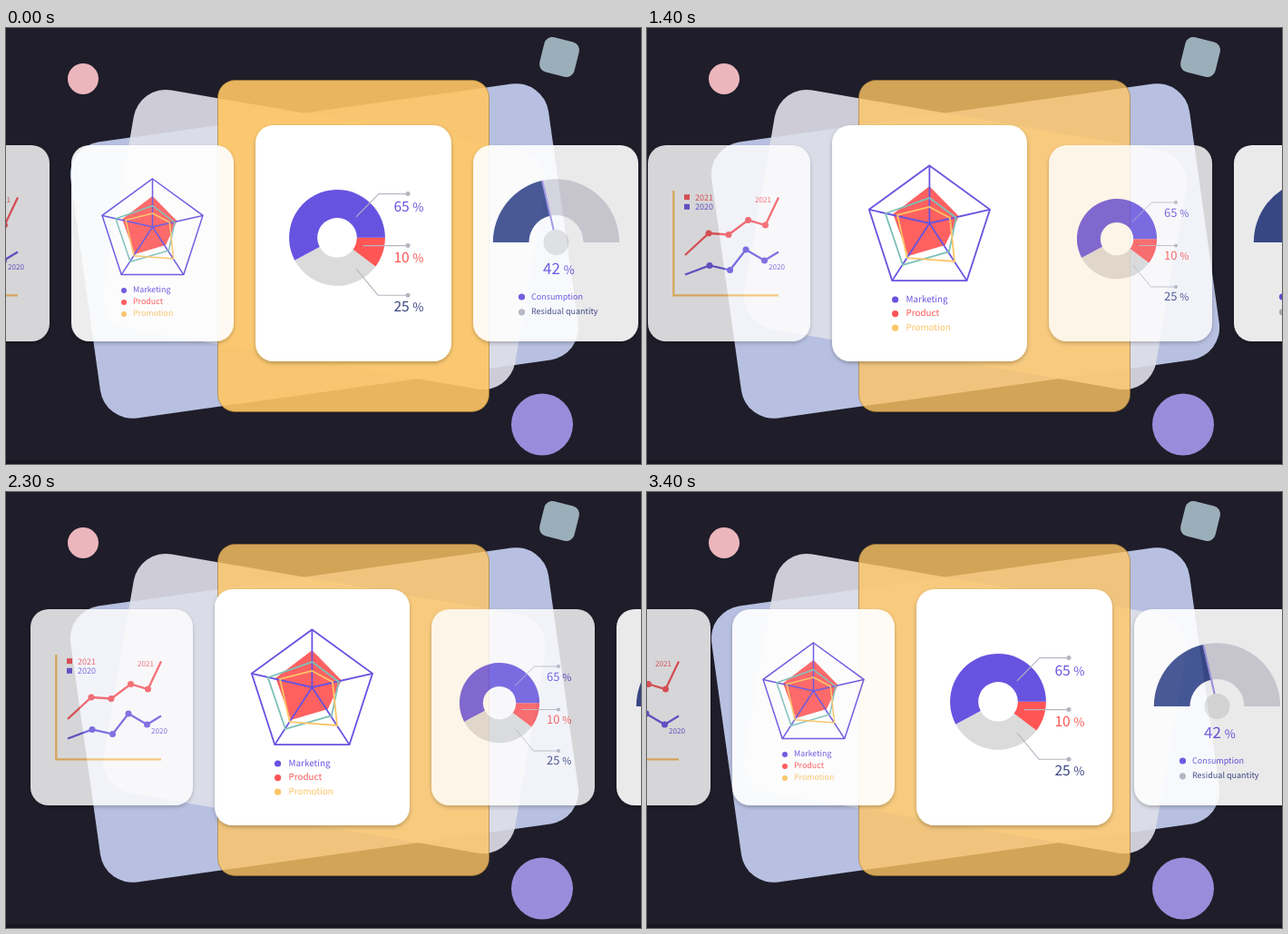
Animation of 700 by 480 pixels, one loop 3.5 s. Source, as an HTML page:

```html
<!DOCTYPE html>
<html lang="en">
<head>
<meta charset="utf-8">
<title>Chart carousel</title>
<style>
html, body { margin: 0; width: 100%; height: 100%; overflow: hidden; background: #1e1d29; }
svg { display: block; width: 100%; height: 100%; }
text { font-family: "Noto Sans CJK KR", "Noto Sans CJK JP", "Noto Sans CJK SC", "Noto Sans", sans-serif; font-weight: 500; white-space: pre; text-rendering: geometricPrecision; }
</style>
</head>
<body>
<svg viewBox="0 0 700 480" xmlns="http://www.w3.org/2000/svg">
  <defs>
    <filter id="shadow" x="-10%" y="-10%" width="120%" height="125%">
      <feDropShadow dx="0" dy="2" stdDeviation="2" flood-color="#000" flood-opacity=".26"/>
    </filter>
    <rect id="sheet" x="-266" y="-153.5" width="532" height="307" rx="36" transform="translate(351 245.5) rotate(-8)"/>
    <clipPath id="sheetClip"><use href="#sheet"/></clipPath>
    <rect id="pane" x="-230.2" y="-133.4" width="460.4" height="266.8" rx="36" transform="translate(351 233) rotate(9.8)"/>
  </defs>
  <rect width="700" height="480" fill="#1e1d29"/>
  <rect y="476" width="700" height="4" fill="#171620"/>
  <circle cx="85" cy="56" r="17" fill="#ebb6bc"/>
  <rect x="-19.7" y="-19.7" width="39.4" height="39.4" rx="9" fill="#9bafba" transform="translate(610 32) rotate(14)"/>
  <use href="#pane" fill="#cdccd7"/>
  <use href="#sheet" fill="#b7c0e0"/>
  <g clip-path="url(#sheetClip)"><use href="#pane" fill="#dadde8"/></g>
  <circle cx="591" cy="436.5" r="34" fill="#998ddb"/>
  <rect id="panel" x="233.5" y="57.5" width="299" height="365" rx="19" fill="#ffc664" stroke="#9a7430" stroke-opacity=".6"/>
  <g id="deck"></g>
</svg>
<script>
const PURPLE = '#6753e0', RED = '#ff5555', YELLOW = '#fcc566', TEAL = '#7dc0b8', NAVY = '#3c4582', GREY = '#b6b6c2';
const ZOOM = 1.2;

const text = (x, y, size, fill, s) => `<text x="${x}" y="${y}" font-size="${size}" fill="${fill}">${s}</text>`;
const dot = (x, y, r, fill) => `<circle cx="${x}" cy="${y}" r="${r}" fill="${fill}"/>`;
const line = (pts, color, w) => `<polyline points="${pts}" fill="none" stroke="${color}" stroke-width="${w}"/>`;
const loop = (pts, color, w) => `<polygon points="${pts}" fill="none" stroke="${color}" stroke-width="${w}"/>`;
const percent = (x, y, big, small, fill, n) =>
  text(x, y, big, fill, `${n} <tspan font-size="${small}">%</tspan>`);

// Ring segment, angles in degrees clockwise from the right
function sector(cx, cy, R, r, from, to, fill) {
  const at = (rad, deg) => {
    const a = deg * Math.PI / 180;
    return `${(cx + rad * Math.cos(a)).toFixed(2)} ${(cy + rad * Math.sin(a)).toFixed(2)}`;
  };
  const big = to - from > 180 ? 1 : 0;
  return `<path fill="${fill}" d="M${at(R, from)}A${R} ${R} 0 ${big} 1 ${at(R, to)}L${at(r, to)}A${r} ${r} 0 ${big} 0 ${at(r, from)}Z"/>`;
}

function trendChart() {
  const red = '#fb5a5e', violet = '#6f5be1';
  const series = (pts, color) => line(pts.join(' '), color, 2.3) +
    pts.slice(1, 5).map(([x, y]) => dot(x, y, 3.5, color)).join('');
  const key = (y, color, year) =>
    `<rect x="40" y="${y}" width="6" height="6" fill="${color}"/>` + text(52, y + 6.4, 9, color, year);
  return line('28.3,50 28.3,165.4 144,165.4', YELLOW, 2.3) +
    key(54.2, red, 2021) + key(64.8, violet, 2020) +
    series([[41, 121], [67, 97], [89, 98.5], [110.5, 82.5], [129.5, 88], [144, 57.5]], red) +
    series([[41, 142.5], [68, 132.5], [90.5, 137.5], [108, 115], [128.5, 127], [144, 117.5]], violet) +
    text(118, 63.2, 8.1, red, 2021) + text(133, 137.3, 8.1, violet, 2020);
}

function radarChart(active) {
  const cx = 89.5, hub = 90, size = active ? 8.2 : 8.9;
  const corners = [0, 1, 2, 3, 4].map(i => {
    const a = i * Math.PI * 0.4;
    return [(cx + 58.4 * Math.sin(a)).toFixed(1), (95.4 - 58.4 * Math.cos(a)).toFixed(1)];
  });
  const key = (y, color, name) => dot(58, y, 3, color) + text(68, y + 2.4, size, color, name);
  return `<polygon points="89.5,56 116.5,83.5 104,110 70,120 56,81.5" fill="${RED}" fill-opacity=".93"/>` +
    loop(corners.join(' '), PURPLE, 1.5) +
    corners.map(p => line(`${cx},${hub} ${p}`, PURPLE, 1.5)).join('') +
    loop('89.5,66.7 114,85 107.5,116 65,128.3 49,81', TEAL, 1.5) +
    loop('89.5,75 108.3,85 112.5,125 69,121.7 60,82.5', YELLOW, 1.5) +
    key(160, PURPLE, 'Marketing') + key(173, RED, 'Product') + key(186, YELLOW, 'Promotion');
}

function donutChart() {
  const ring = (a, b, fill) => sector(75, 103.2, 44.1, 18.2, a, b, fill);
  const lead = (pts, y) => line(pts, GREY, .9) + dot(140, y, 2.1, GREY);
  return ring(36, 152, '#dbdbdb') + ring(0, 36.6, RED) + ring(152, 360, PURPLE) +
    lead('92.5,84 113.3,63 140,63', 63) +
    lead('99,110.5 140,110.5', 110.5) +
    lead('92.5,131.7 112.5,156 140,156', 156) +
    percent(127, 79, 13, 11, PURPLE, 65) +
    percent(127, 125.8, 13, 11, RED, 10) +
    percent(127, 171, 13, 11, NAVY, 25);
}

function gaugeChart() {
  const cx = 91.5, cy = 107;
  return sector(cx, cy, 69.7, 30, 257, 360, '#d7d6df') +
    sector(cx, cy, 69.7, 30, 180, 257, '#3a4c8e') +
    line('76.2,39 88.8,94', '#a298e8', 2) +
    dot(cx, cy, 14, '#e4e4e4') +
    percent(77, 142, 17, 13, PURPLE, 42) +
    dot(53.5, 167, 3.6, PURPLE) + text(64, 170, 9, PURPLE, 'Consumption') +
    dot(53.5, 183.8, 3.6, GREY) + text(64, 186.3, 9, NAVY, 'Residual quantity');
}

function card(x, w, alpha, chart, active) {
  const k = active ? ZOOM : 1, y = active ? 107 : 129, h = active ? 260 : 216;
  return `<g transform="translate(${x} ${y})" opacity="${active ? 1 : alpha}">` +
    `<rect width="${w}" height="${h}" rx="20" fill="#fff" filter="url(#shadow)"/>` +
    `<g transform="scale(${k})">${chart(active)}</g></g>`;
}

const row = radarOn => '<g>' +
  card(0, 179, .82, trendChart, false) +
  card(203, radarOn ? 215 : 179, .92, radarChart, radarOn) +
  card(radarOn ? 442 : 406, radarOn ? 180 : 216, .82, donutChart, !radarOn) +
  card(646, 182, .91, gaugeChart, false) + '</g>';

const deck = document.getElementById('deck');
const panel = document.getElementById('panel');
deck.innerHTML = row(false) + row(true);
const [donutRow, radarRow] = deck.children;

const LOOP = 3500, STEP = 100;
// [ms, x of the row]
const track = [[0, -131], [400, -131], [800, -23], [900, -13.3], [1300, -13.3], [1900, 72.7],
  [2100, 72.7], [2500, -18.5], [2600, -22], [3000, -22], [3500, -131]];

function rowX(t) {
  const i = track.findIndex(k => k[0] > t);
  const [t0, x0] = track[i - 1], [t1, x1] = track[i];
  return x0 + (x1 - x0) * (t - t0) / (t1 - t0);
}

function draw(ms) {
  const t = Math.floor(ms % LOOP / STEP) * STEP;
  const radarOn = t >= 900 && t < 2600;
  donutRow.setAttribute('display', radarOn ? 'none' : 'inline');
  radarRow.setAttribute('display', radarOn ? 'inline' : 'none');
  deck.setAttribute('transform', `translate(${Math.round(rowX(t))} 0)`);
  panel.setAttribute('fill-opacity', t < 500 ? .9 : .8);
}

const start = performance.now();
function tick() {
  draw(performance.now() - start);
  requestAnimationFrame(tick);
}
tick();
</script>
</body>
</html>
```
